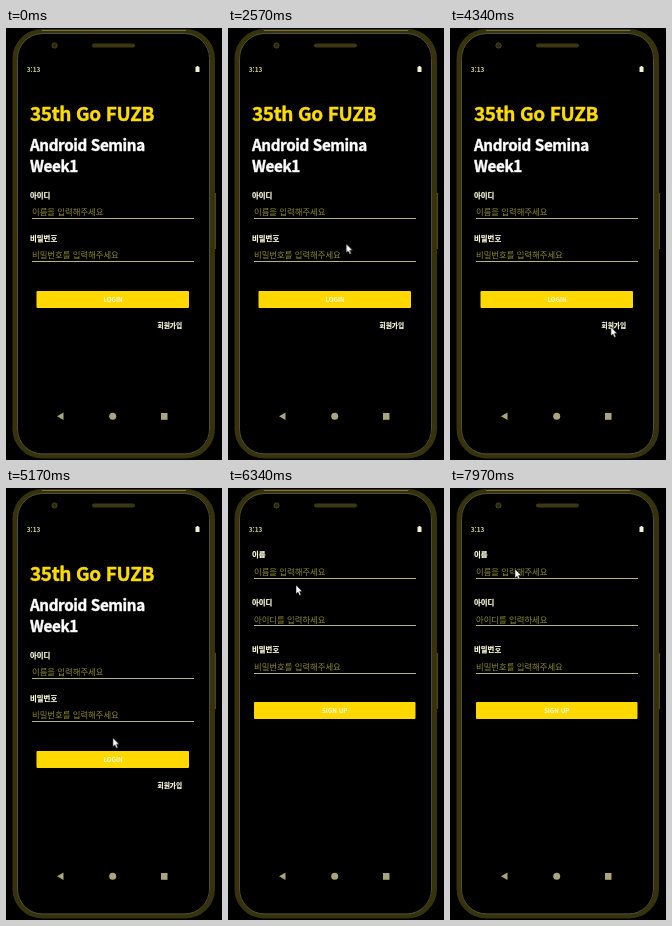
An HTML page for the animation above (8 s loop, 216 px wide and 432 px high).

```html
<!DOCTYPE html>
<html lang="ko">
<head>
<meta charset="utf-8">
<title>Login to sign-up</title>
<style>
  html, body { margin: 0; width: 100%; height: 100%; overflow: hidden; background: #000; }
  svg { display: block; width: 100vw; height: 100vh; }
  text { font-family: "Noto Sans CJK KR", "Noto Sans CJK", "Noto Sans", sans-serif; fill: #fff; }
  .title, .heading { font-weight: 700; letter-spacing: -.38px; stroke-width: .4px; }
  .title { font-size: 19px; fill: #ffdc00; stroke: #ffdc00; }
  .heading { font-size: 15.2px; stroke: #fff; }
  .label, .link { font-weight: 700; fill: #fffde0; stroke: #fffde0; stroke-width: .2px; }
  .label { font-size: 7.4px; }
  .link { font-size: 6.7px; }
  .hint { font-size: 8.35px; fill: #8c8630; }
  .caption { font-size: 6.2px; font-weight: 700; fill: #fffbd0; text-anchor: middle; }
  .clock { font-size: 6.5px; font-weight: 700; fill: #d6d08c; }
  .line { stroke: #b5b27c; stroke-width: 1; }
  .button { fill: #ffd800; }
  .page { transform-origin: 106.5px 223px; }

  .login { animation: leave 8s infinite; }
  .signup { animation: enter 8s infinite, appear 8s linear infinite; }
  .cursor { animation: point 8s linear infinite; }

  /* 400 ms activity change: fast out, extra slow in */
  @keyframes leave {
    0% { transform: none; }
    70.75% { transform: scale(1); animation-timing-function: cubic-bezier(.3, 0, .8, .15); }
    71.583% { transform: scale(1.02); animation-timing-function: cubic-bezier(.05, .7, .1, 1); }
    75.75%, 100% { transform: scale(1.05); }
  }
  @keyframes enter {
    0% { transform: scale(.85); }
    70.75% { transform: scale(.85); animation-timing-function: cubic-bezier(.3, 0, .8, .15); }
    71.583% { transform: scale(.91); animation-timing-function: cubic-bezier(.05, .7, .1, 1); }
    75.75%, 100% { transform: scale(1); }
  }
  @keyframes appear {
    0%, 71.375% { opacity: 0; }
    72%, 100% { opacity: 1; }
  }
  @keyframes point {
    0%, 11.25% { transform: translate(-12px, 70px); animation-timing-function: ease-out; }
    18.9% { transform: translate(72px, 104px); animation-timing-function: ease-in-out; }
    43.9% { transform: translate(156px, 307px); animation-timing-function: ease-in-out; }
    58.75% { transform: translate(162px, 297px); animation-timing-function: ease-in; }
    64.6% { transform: translate(107px, 250px); }
    71.75% { transform: translate(83px, 198px); }
    79.25% { transform: translate(68px, 97px); animation-timing-function: ease-out; }
    99.6%, 100% { transform: translate(65px, 81px); }
  }
</style>
</head>
<body>
<svg viewBox="0 0 216 432" preserveAspectRatio="none">
  <rect width="216" height="432"/>

  <g fill="none">
    <rect x="9" y="3.5" width="197.5" height="424.5" rx="27" stroke="#35320c" stroke-width="5"/>
    <rect x="11.5" y="5.5" width="192" height="420.5" rx="25" stroke="#514d38"/>
    <path d="M36 2.5H180" stroke="#77723f"/>
    <path d="M209.3 165V221" stroke="#4a4518" stroke-width="1.5"/>
    <path d="M88 17.5H127" stroke="#3b3712" stroke-width="4" stroke-linecap="round"/>
    <circle cx="48.5" cy="17.5" r="2.6" fill="#2a2712" stroke="#4a451c"/>
  </g>

  <g class="page login">
    <text class="title" x="24" y="93">35th Go FUZB</text>
    <text class="heading" x="24" y="122.5">Android Semina</text>
    <text class="heading" x="24" y="143.5">Week1</text>
    <text class="label" x="24" y="170">아이디</text>
    <text class="hint" x="26" y="187.3">이름을 입력해주세요</text>
    <path class="line" d="M26 190.5H188"/>
    <text class="label" x="24" y="213.3">비밀번호</text>
    <text class="hint" x="26" y="230.3">비밀번호를 입력해주세요</text>
    <path class="line" d="M26 233.5H188"/>
    <rect class="button" x="30.5" y="263" width="152.5" height="17" rx="1"/>
    <text class="caption" x="107" y="273.7">LOGIN</text>
    <text class="link" x="151.5" y="299.5">회원가입</text>
  </g>

  <g class="page signup">
    <rect x="15" y="50" width="186" height="325"/>
    <text class="label" x="24" y="69">이름</text>
    <text class="hint" x="26" y="86.7">이름을 입력해주세요</text>
    <path class="line" d="M26 90.5H188"/>
    <text class="label" x="24" y="117">아이디</text>
    <text class="hint" x="26" y="134.5">아이디를 입력하세요</text>
    <path class="line" d="M26 137.5H188"/>
    <text class="label" x="24" y="164.3">비밀번호</text>
    <text class="hint" x="26" y="182">비밀번호를 입력해주세요</text>
    <path class="line" d="M26 185.5H188"/>
    <rect class="button" x="26" y="214" width="161.5" height="17" rx="1"/>
    <text class="caption" x="106.7" y="224.9">SIGN UP</text>
  </g>

  <text class="clock" x="20.7" y="43.5">3:13</text>
  <path d="M189.5 39H190.5V38H192.5V39H193.5V44H189.5Z" fill="#f4f0d2"/>
  <g fill="#aaa57c">
    <path d="M57.5 384.5V392L51 388.2Z"/>
    <circle cx="106.7" cy="388.3" r="3.5"/>
    <rect x="155" y="385" width="6.5" height="6.8"/>
  </g>

  <path class="cursor" d="M0 0V9L2 7.2L3.5 10.5L5 9.8L3.6 6.6H6.3Z" fill="#fff" stroke="#000" stroke-width=".5"/>
</svg>
</body>
</html>
```
